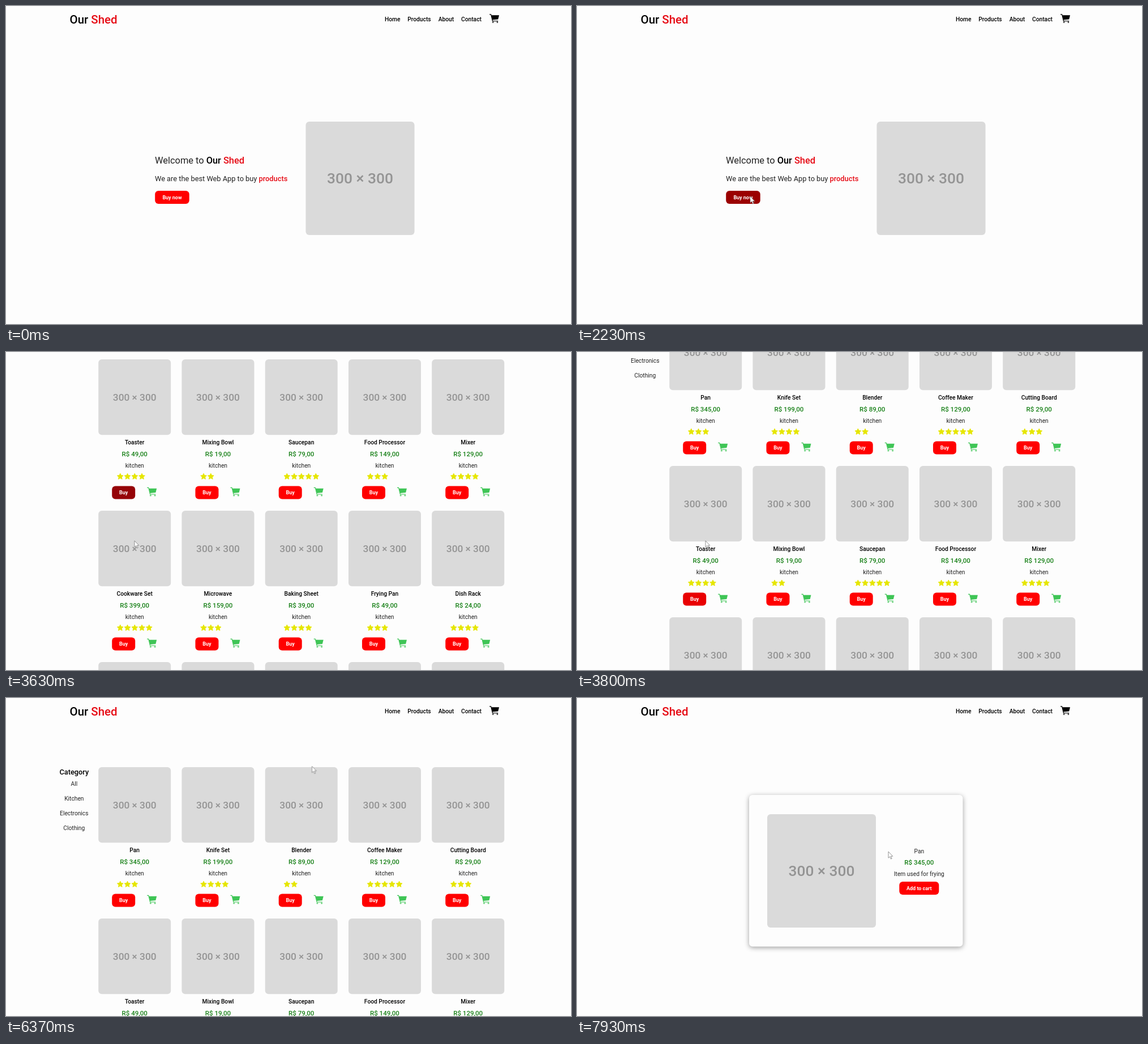
An HTML page for the animation above (8 s loop, 998x561 px).

```html
<!DOCTYPE html>
<html lang="en">
<head>
<meta charset="utf-8">
<title>Shop demo</title>
<style>
  html, body { margin: 0; width: 100%; height: 100%; overflow: hidden; background: #fdfdfd; }
  svg { display: block; width: 100vw; height: 100vh; font: 10.24px Roboto, sans-serif; fill: #222; }
  .bold { font-weight: 500; fill: #000; }
  .red { fill: #e60a14; font-weight: 500; }
  .price { font-size: 11.52px; font-weight: 500; fill: #178017; }
  .label { font-size: 8.96px; font-weight: 700; fill: #fff; }
  .photo { fill: #dadada; }
  .size { font-weight: 500; fill: #949494; }
  .button { fill: #f00; }
  .star { fill: #e6e600; stroke: #e6e600; stroke-linejoin: round; }
  .panel { fill: #fdfdfd; filter: drop-shadow(0 2px 4px rgba(0, 0, 0, .38)); }
  .header-cart { color: #000; }
  .item-cart { color: #3fc556; }

  /* One loop is 8 s, so 1% is 80 ms. */
  #scroll { animation: scroll 8s step-end infinite; }
  #home { animation: home 8s step-end infinite; }
  #list { animation: list 8s step-end infinite; }
  #detail { animation: detail 8s step-end infinite; }
  #cursor { animation: move 8s ease-in-out infinite; }
  #arrow { animation: arrow 8s step-end infinite; }
  #hand { animation: hand 8s step-end infinite; }
  #buy-now { animation: hover-hero 8s linear infinite; }
  #buy-0 { animation: hover-pan 8s linear infinite; }
  #buy-5 { animation: hover-toaster 8s linear infinite; }

  @keyframes scroll {
    0%, 48.75%, 100% { transform: translateY(0); }
    36.25%, 48.1% { transform: translateY(-94px); }
    38.5%, 47.4% { transform: translateY(-188px); }
    42%, 46.5% { transform: translateY(-282px); }
    45% { transform: translateY(-376px); }
  }
  @keyframes home {
    0% { visibility: visible; }
    28.3%, 100% { visibility: hidden; }
  }
  @keyframes list {
    0%, 63.75%, 91.25%, 100% { visibility: hidden; }
    28.3%, 77.5% { visibility: visible; }
  }
  @keyframes detail {
    0% { visibility: hidden; }
    91.25%, 100% { visibility: visible; }
  }
  @keyframes move {
    0%, .4% { transform: translate(6px, 400px); animation-timing-function: ease-in; }
    5% { transform: translate(170px, 372px); animation-timing-function: ease-out; }
    10.5% { transform: translate(362px, 290px); }
    15.6% { transform: translate(313px, 348px); }
    19.1%, 28.3% { transform: translate(306px, 336px); }
    35.6%, 39.2% { transform: translate(226px, 331px); }
    45.3%, 49% { transform: translate(227px, 333px); }
    58.8% { transform: translate(858px, 17px); }
    60.3%, 63.75% { transform: translate(866px, 16px); }
    71.25%, 77.5% { transform: translate(730px, 19px); animation-timing-function: ease-in; }
    79.63% { transform: translate(541px, 120px); animation-timing-function: ease-out; }
    87.5%, 91.5% { transform: translate(212px, 356px); animation-timing-function: ease-in; }
    97.9% { transform: translate(507px, 303px); animation-timing-function: ease-out; }
    99.1%, 100% { transform: translate(550px, 271px); }
  }
  @keyframes arrow {
    0%, 58.8%, 70%, 100% { visibility: hidden; }
    .375%, 64.8%, 77.9% { visibility: visible; }
  }
  @keyframes hand {
    0%, 64.8%, 77.9%, 100% { visibility: hidden; }
    58.8%, 70% { visibility: visible; }
  }
  @keyframes hover-hero {
    0%, 15% { fill: #f00; }
    18.5%, 28.3% { fill: #9b0000; }
    28.4%, 100% { fill: #f00; }
  }
  @keyframes hover-toaster {
    0%, 42.2% { fill: #f00; }
    44.5%, 45.6% { fill: #950408; }
    48%, 100% { fill: #f00; }
  }
  @keyframes hover-pan {
    0%, 85.5% { fill: #f00; }
    88.5%, 91.25% { fill: #9b0000; }
    91.3%, 100% { fill: #f00; }
  }
</style>
</head>
<body>
<svg viewBox="0 0 998 561" preserveAspectRatio="none">
  <defs>
    <g id="cart">
      <path d="M3 2.2H17L15.2 9.6L5.2 10.6Z" fill="currentColor"/>
      <path d="M0 .8H2.6L5.4 12.5H15.2" fill="none" stroke="currentColor" stroke-width="1.2"/>
      <g fill="currentColor" opacity=".75">
        <circle cx="6.2" cy="14.7" r="1.4"/><circle cx="13.9" cy="14.7" r="1.4"/>
      </g>
    </g>
  </defs>
  <g id="scroll">
    <g id="header"></g>
    <g id="home"></g>
    <g id="list"></g>
    <g id="detail"></g>
  </g>
  <g id="cursor" stroke="#666" stroke-width=".7" stroke-linejoin="round" fill="#fff">
    <path id="arrow" d="M0 0V11.2L2.6 8.8L4.4 13L6.2 12.2L4.4 8.2H7.8Z"/>
    <path id="hand" d="M2.4 9V1.2Q3.3 -.5 4.3 1.2V5.2Q5.4 4.4 6.1 5.6Q7.3 5 7.8 6.3Q9.4 6 9.5 7.6V11Q9.2 13 8.2 15H3.8Q2.6 12.6 .4 9.8Q.2 7.6 2.4 9Z"/>
  </g>
</svg>
<script>
  const products = [
    ["Pan", 345, 3], ["Knife Set", 199, 4], ["Blender", 89, 2], ["Coffee Maker", 129, 5], ["Cutting Board", 29, 3],
    ["Toaster", 49, 4], ["Mixing Bowl", 19, 2], ["Saucepan", 79, 5], ["Food Processor", 149, 3], ["Mixer", 129, 4],
    ["Cookware Set", 399, 5], ["Microwave", 159, 3], ["Baking Sheet", 39, 4], ["Frying Pan", 49, 3], ["Dish Rack", 24, 4]
  ];
  const brand = '<tspan class="bold">Our</tspan> <tspan class="red">Shed</tspan>';

  const text = (x, y, content, cls = "", size = "", anchor = "start") =>
    `<text x="${x}" y="${y}" class="${cls}" text-anchor="${anchor}"${size && ` style="font-size:${size}px"`}>${content}</text>`;
  const centred = (x, y, content, cls, size) => text(x, y, content, cls, size, "middle");
  const box = (x, y, w, h, cls, id = "") =>
    `<rect x="${x}" y="${y}" width="${w}" height="${h}" rx="6" class="${cls}"${id && ` id="${id}"`}/>`;
  const button = (x, y, w, label, id) =>
    box(x, y, w, 23, "button", id) + centred(x + w / 2, y + 14.7, label, "label");
  const photo = (x, y, w, h, size) =>
    box(x, y, w, h, "photo") + centred(x + w / 2, y + h / 2 + size * .36, "300 × 300", "size", size);
  const cart = (x, y, cls) => `<use href="#cart" x="${x}" y="${y}" class="${cls}"/>`;

  function star(cx, cy) {
    const points = Array.from({ length: 10 }, (_, i) => {
      const angle = i * Math.PI / 5 - Math.PI / 2, r = i % 2 ? 2.7 : 5.6;
      return (cx + r * Math.cos(angle)).toFixed(2) + "," + (cy + r * Math.sin(angle)).toFixed(2);
    });
    return `<polygon class="star" points="${points.join(" ")}"/>`;
  }

  function card([name, price, rating], i) {
    const x = 163.2 + i % 5 * 147.25, y = 122 + Math.floor(i / 5) * 267, mid = x + 64;
    const stars = Array.from({ length: rating }, (_, k) => star(x + 38.6 + k * 12.75, y + 206.8));
    return photo(x, y, 128, 133.3, 17.3)
      + centred(mid, y + 150.3, name, "bold")
      + centred(mid, y + 171.2, `R$ ${price},00`, "price")
      + centred(mid, y + 191, "kitchen")
      + stars.join("")
      + button(x + 24, y + 223.5, 41, "Buy", "buy-" + i)
      + cart(x + 86, y + 225.5, "item-cart");
  }

  const fill = (id, ...parts) => document.getElementById(id).innerHTML = parts.join("");

  fill("header",
    text(112.5, 31, brand, "", 20.48),
    text(669, 27, "Home", "bold"), text(709.3, 27, "Products", "bold"),
    text(763.7, 27, "About", "bold"), text(804, 27, "Contact", "bold"),
    cart(854, 14, "header-cart"));

  fill("home",
    text(263, 278, "Welcome to " + brand, "", 16.4),
    text(263, 309, 'We are the best Web App to buy <tspan class="red">products</tspan>', "", 12.8),
    button(263.2, 326, 60.5, "Buy now", "buy-now"),
    photo(529.5, 204, 192, 200, 26.3));

  fill("list",
    centred(120.3, 134.6, "Category", "bold", 12.8),
    ["All", "Kitchen", "Electronics", "Clothing"].map((name, i) => centred(120.3, 154.7 + i * 26.1, name)).join(""),
    products.map(card).join(""),
    Array.from({ length: 5 }, (_, i) => photo(163.2 + i * 147.25, 923, 128, 133.3, 17.3)).join(""));

  fill("detail",
    box(304, 171, 377.5, 267.5, "panel"),
    photo(336, 205, 192, 200, 26.3),
    centred(604.3, 273.7, "Pan"),
    centred(604.3, 294.2, "R$ 345,00", "price"),
    centred(604.3, 314.3, "Item used for frying"),
    button(569.3, 324, 70, "Add to cart"));
</script>
</body>
</html>
```
